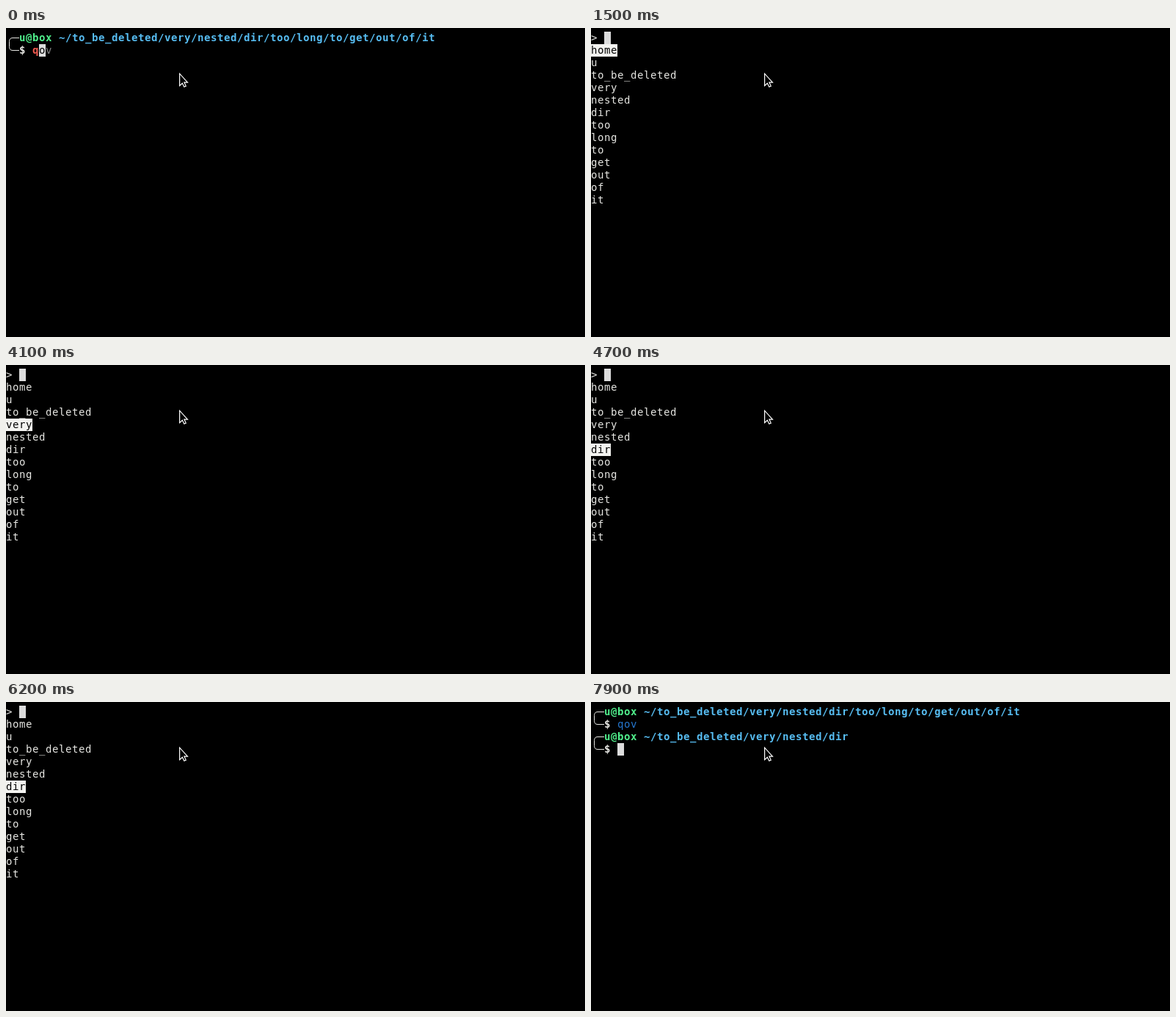
These frames come from a looping animation (789 px wide and 421 px high, 8000 ms). An HTML page:

```html
<!DOCTYPE html>
<html lang="en">
<head>
<meta charset="utf-8">
<title>Terminal directory picker</title>
<style>
  html, body { margin: 0; width: 100%; height: 100%; overflow: hidden; background: #000; }
  #stage { position: absolute; left: 0; top: 0; width: 789px; height: 421px; overflow: hidden; }
  .screen, svg { position: absolute; left: 0; top: 0; width: 100%; height: 100%; }
  .run {
    position: absolute; height: 17px; white-space: pre;
    font: 14px/17px "DejaVu Sans Mono", monospace;
    letter-spacing: calc(9px - 1ch); color: #e6e6e2;
  }
  .bold { font-weight: bold; }
  .user { color: #50f08c; }
  .path { color: #57bdf2; }
  .bad { color: #f05a50; }
  .good { color: #2577cf; }
  .hint { color: #858585; }
  .cursor { background: #dcdcdc; color: #000; }
  .picked { background: #f3f3f0; color: #000; }
  .bracket { fill: none; stroke: #e6e6e2; }
  .pointer { fill: #000; stroke: #fff; stroke-width: 1.2; }
</style>
</head>
<body>
<div id="stage"></div>
<script>
const LOOP = 8000, CELL = 9, ROW = 17, TOP = 5;
const SVG = 'http://www.w3.org/2000/svg';
const stage = document.getElementById('stage');
const dirs = 'home u to_be_deleted very nested dir too long to get out of it'.split(' ');
const deepPath = '~/' + dirs.slice(2).join('/');
const shortPath = '~/' + dirs.slice(2, 6).join('/');

function text(screen, col, row, content, style = '') {
  const run = document.createElement('span');
  run.className = 'run ' + style;
  run.textContent = content;
  run.style.left = col * CELL + 'px';
  run.style.top = TOP + row * ROW + 'px';
  screen.append(run);
}

function shape(parent, d, style) {
  const svg = document.createElementNS(SVG, 'svg');
  const path = document.createElementNS(SVG, 'path');
  path.setAttribute('d', d);
  path.setAttribute('class', style);
  svg.append(path);
  parent.append(svg);
}

function prompt(screen, row, path) {
  const y = TOP + row * ROW + 8.5;
  shape(screen, `M18 ${y}H9Q4.5 ${y} 4.5 ${y + 5}v7Q4.5 ${y + ROW} 9 ${y + ROW}H18`, 'bracket');
  text(screen, 2, row, 'u@box', 'bold user');
  text(screen, 8, row, path, 'bold path');
  text(screen, 2, row + 1, '$', 'bold');
}

function typing(screen) {
  prompt(screen, 0, deepPath);
  text(screen, 4, 1, 'q', 'bold bad');
  text(screen, 5, 1, 'o', 'cursor');
  text(screen, 6, 1, 'v', 'hint');
}

function command(screen, cursorCol, cursorRow) {
  prompt(screen, 0, deepPath);
  text(screen, 4, 1, 'qov', 'good');
  text(screen, cursorCol, cursorRow, ' ', 'cursor');
}

function picker(screen, picked) {
  text(screen, 0, 0, '>');
  text(screen, 2, 0, ' ', 'cursor');
  dirs.forEach((dir, i) => text(screen, 0, i + 1, dir, i === picked ? 'picked' : ''));
}

function result(screen) {
  command(screen, 4, 3);
  prompt(screen, 2, shortPath);
}

// [start time in ms, screen, arguments]
const steps = [
  [0, typing],
  [1200, command, 7, 1],
  ...[[1500, 0], [3400, 1], [3800, 2], [4100, 3], [4500, 4], [4700, 5], [4900, 6],
    [5100, 7], [5600, 8], [6000, 7], [6100, 6], [6200, 5]].map(([t, i]) => [t, picker, i]),
  [7800, command, 0, 2],
  [7900, result],
];

steps.forEach(([start, draw, ...args], i) => {
  const end = i + 1 < steps.length ? steps[i + 1][0] : LOOP;
  const screen = document.createElement('div');
  screen.className = 'screen';
  draw(screen, ...args);
  stage.append(screen);
  const key = (time, opacity) => ({ offset: time / LOOP, opacity, easing: 'step-end' });
  const frames = [key(start, 1), key(end, end < LOOP ? 0 : 1)];
  if (start > 0) frames.unshift(key(0, 0));
  if (end < LOOP) frames.push(key(LOOP, 0));
  screen.animate(frames, { duration: LOOP, iterations: Infinity });
});

shape(stage, 'M236.6 62.2V78.6L240.3 75.2L242.8 80.2L245.2 79.1L242.9 74.1H247.4Z', 'pointer');
</script>
</body>
</html>
```
